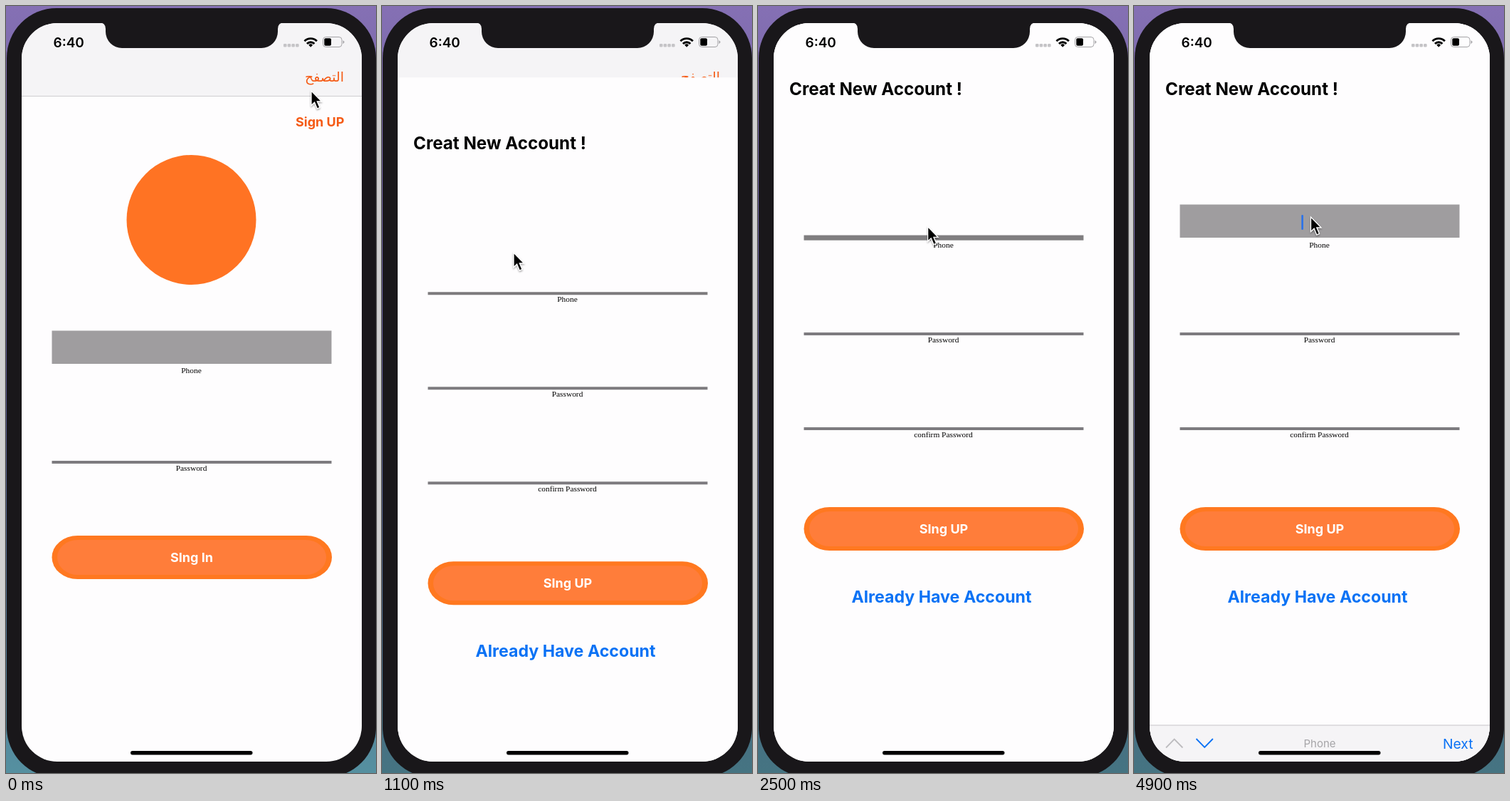
An HTML page that plays this animation: 520 px wide and 1076 px high, repeating every 5000 ms.

```html
<!DOCTYPE html>
<html lang="en">
<head>
<meta charset="utf-8">
<style>
html, body { margin: 0; width: 100%; height: 100%; overflow: hidden; }
svg { display: block; width: 520px; height: 1076px; }
text { font-family: Inter, sans-serif; }
.bold { font-weight: 700; }
.hint { font: 11.4px "Liberation Serif", serif; text-anchor: middle; }
.mid { text-anchor: middle; }
.action { font-size: 18px; font-weight: 700; fill: #fff; text-anchor: middle; }
.orange { fill: #f55a14; }
.line { fill: #7d7b7f; }
</style>
</head>
<body>
<svg viewBox="0 0 520 1076">
  <defs>
    <linearGradient id="desk" x2="0" y2="1">
      <stop offset="0" stop-color="#8570b4"/>
      <stop offset=".5" stop-color="#56548a"/>
      <stop id="deskEnd" offset="1" stop-color="#5590a0"/>
    </linearGradient>
    <clipPath id="screen"><rect x="22" y="24" width="478" height="1036" rx="50"/></clipPath>
    <filter id="shadow" x="-50%" y="-50%" width="200%" height="200%">
      <feDropShadow dx="0" dy="1.5" stdDeviation="1.2" flood-opacity=".4"/>
    </filter>
    <g id="button">
      <rect x="64.5" width="393.5" height="61" rx="36" ry="30.5" fill="#ff7820"/>
      <rect x="72" y="6" width="378" height="49" rx="29" ry="24.5" fill="#ff7d3a"/>
    </g>
  </defs>

  <rect width="520" height="1076" fill="url(#desk)"/>
  <rect x="1" y="3" width="519" height="1079" rx="70" fill="#19171a"/>

  <g clip-path="url(#screen)">
    <rect width="520" height="1076" fill="#fefdfe"/>
    <g id="login">
      <rect y="24" width="520" height="102" fill="#f5f4f6"/>
      <rect y="126" width="520" height="1" fill="#cfced1"/>
      <text class="orange" x="447.5" y="106" text-anchor="middle" style="font: 19px 'DejaVu Sans', sans-serif">التصفح</text>
      <text id="signUp" class="bold orange" x="407" y="169" font-size="18">Sign UP</text>
      <circle cx="260.5" cy="300" r="91" fill="#ff7323"/>
      <rect x="64.5" y="455.5" width="393" height="46.5" fill="#9f9d9f"/>
      <text class="hint" x="260.5" y="515">Phone</text>
      <rect class="line" x="64.5" y="638" width="393" height="4"/>
      <text class="hint" x="260.5" y="652">Password</text>
      <use href="#button" y="743"/>
      <text class="action" x="261" y="780">SIng In</text>
    </g>

    <g id="sheet">
      <rect y="24" width="520" height="1052" fill="#fefdfe"/>
      <text class="bold" x="44" y="125" font-size="24.2">Creat New Account !</text>
      <rect id="field" x="64.5" width="393"/>
      <text class="hint" x="260.5" y="338.5">Phone</text>
      <rect class="line" x="64.5" y="458" width="393" height="4"/>
      <text class="hint" x="260.5" y="471.5">Password</text>
      <rect class="line" x="64.5" y="591" width="393" height="4"/>
      <text class="hint" x="260.5" y="604.5">confirm Password</text>
      <use href="#button" y="703"/>
      <text class="action" x="261" y="740">SIng UP</text>
      <text class="bold mid" x="258" y="836.5" font-size="23.2" fill="#0a72f5">Already Have Account</text>
      <rect id="caret" x="235.3" y="293" width="2.6" height="21" rx="1.2" fill="#2a72ea"/>
    </g>

    <g id="toolbar">
      <rect y="1008.5" width="520" height="80" fill="#f5f4f6"/>
      <rect y="1008.5" width="520" height="1" fill="#c9c8cb"/>
      <g fill="none" stroke-width="1.8">
        <path d="M45 1040.500l11.700-12 11.700 12" stroke="#bdbcbf"/>
        <path d="M87.500 1028l11.700 12 11.700-12" stroke="#0a72f5"/>
      </g>
      <text class="mid" x="261" y="1040" font-size="15" fill="#a5a4a7">Phone</text>
      <text x="434" y="1041.500" font-size="19.300" fill="#0a72f5">Next</text>
    </g>

    <text x="66.5" y="57.5" font-size="19" font-weight="600">6:40</text>
    <g fill="#c5c4c7">
      <rect x="390" y="53" width="4.500" height="4.500" rx="1.300"/>
      <rect x="395.700" y="53" width="4.500" height="4.500" rx="1.300"/>
      <rect x="401.400" y="53" width="4.500" height="4.500" rx="1.300"/>
      <rect x="407.100" y="53" width="4.500" height="4.500" rx="1.300"/>
    </g>
    <g fill="none" stroke="#000" stroke-width="2.900">
      <path d="M419.500 49.200a12.300 12.300 0 0 1 17.400 0"/>
      <path d="M423 52.900a7.200 7.200 0 0 1 10.400 0"/>
    </g>
    <path d="M425.300 54.700a4.200 4.200 0 0 1 5.800 0l-2.900 3z"/>
    <rect x="445.500" y="43.500" width="26.500" height="14" rx="4" fill="none" stroke="#a4a3a6"/>
    <rect x="447.300" y="45.300" width="9.700" height="10.400" rx="2"/>
    <path d="M473.500 48.200q2 .7 2 2.400t-2 2.400z" fill="#a4a3a6"/>
    <rect x="175" y="1045" width="171.500" height="5.500" rx="2.750"/>
  </g>

  <path d="M130 23q10 0 10 9v4a23 23 0 0 0 23 23H359a23 23 0 0 0 23-23v-4q0-9 10-9z" fill="#19171a"/>
  <path id="cursor" d="M0 0V20.500L4.600 16.200 8.300 25 12 23.400 8.300 14.800H14.400Z" stroke="#fff" stroke-width="1.300" filter="url(#shadow)"/>
</svg>

<script>
const [deskEnd, signUp, sheet, field, caret, toolbar, cursor] =
  ["deskEnd", "signUp", "sheet", "field", "caret", "toolbar", "cursor"].map(id => document.getElementById(id));

// Pointer stops: time, x, y
const path = [
  [0, 429, 119], [300, 203, 750], [600, 436, 168], [900, 438, 157],
  [1100, 185, 346], [1300, 178, 362], [1700, 219, 329], [1800, 222, 327],
  [2100, 462, 10], [2400, 238, 310], [2900, 244, 306], [3400, 247, 297],
  [3900, 247, 297], [4300, 248.5, 296], [5000, 248.5, 296]
];

const clamp = v => Math.max(0, Math.min(1, v));
const smooth = v => v * v * (3 - 2 * v);

// Share of the way left in a critically damped spring
function spring(ms) {
  const x = Math.max(0, ms) * 0.01675;
  return (1 + x) * Math.exp(-x);
}

function pointer(t) {
  const i = path.findIndex(p => p[0] > t);
  const [t0, x0, y0] = path[i - 1], [t1, x1, y1] = path[i];
  const k = smooth((t - t0) / (t1 - t0));
  return [x0 + (x1 - x0) * k, y0 + (y1 - y0) * k];
}

const shift = (el, x, y) => el.setAttribute("transform", `translate(${x} ${y})`);

function draw(now) {
  const t = Math.floor(now % 5000 / 100) * 100;

  deskEnd.setAttribute("stop-color", t < 700 ? "#5590a0" : "#457482");
  signUp.setAttribute("opacity", t < 800 ? 1 : clamp(0.2 + (t - 800) * 0.0018));
  shift(sheet, 0, 1036 * spring(t - 845));

  const open = smooth(clamp((t - 2450) / 300));
  const height = 4 + 42.5 * open;
  const grey = 125 + 34 * open;
  field.setAttribute("y", 325 + 4 * (1 - open) - height);
  field.setAttribute("height", height);
  field.setAttribute("fill", `rgb(${grey},${grey - 2},${grey})`);
  caret.setAttribute("opacity", t < 2700 ? 0 : 1);

  shift(toolbar, 0, 68 * spring(t - 2550));
  shift(cursor, ...pointer(t));
  requestAnimationFrame(draw);
}
requestAnimationFrame(draw);
</script>
</body>
</html>
```
